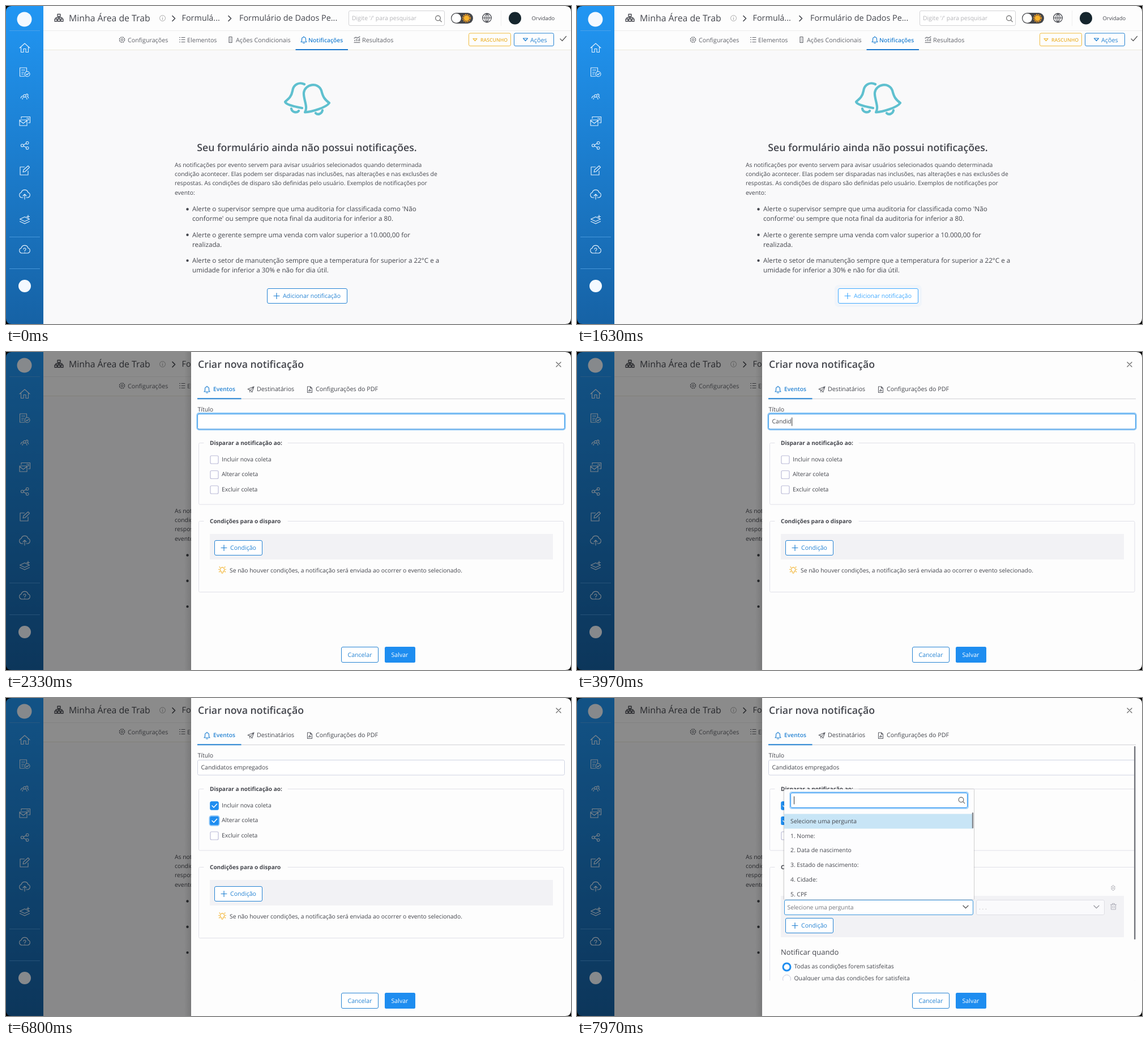
An HTML page for the animation above (8 s loop, 998 px wide and 561 px high).

```html
<!DOCTYPE html>
<html lang="pt-BR">
<head>
<meta charset="utf-8">
<title>Criar nova notificação</title>
<style>
html, body { margin: 0; width: 100%; height: 100%; overflow: hidden; background: #000; }
svg { display: block; width: 998px; height: 561px; font-family: "Open Sans", "Noto Sans", sans-serif; text-rendering: geometricPrecision; }
text { white-space: pre; }
</style>
</head>
<body>
<svg id="stage" viewBox="0 0 998 561"></svg>
<script>
const BLUE = '#1e8df0', LINK = '#2583d3', INK = '#44464d', EDGE = '#e0e0e8';
const LOOP = 8000;

// y is the middle of the capitals
const T = (x, y, size, str, attrs = '') =>
  `<text x="${x}" y="${(y + size * .36).toFixed(2)}" font-size="${size}" ${attrs}>${str}</text>`;
const R = (x, y, w, h, attrs = '') => `<rect x="${x}" y="${y}" width="${w}" height="${h}" ${attrs}/>`;
const C = (x, y, r, attrs = '') => `<circle cx="${x}" cy="${y}" r="${r}" ${attrs}/>`;
const P = (d, color = 'currentColor', width = 1.1, attrs = '') =>
  `<path d="${d}" fill="none" stroke="${color}" stroke-width="${width}" stroke-linecap="round" stroke-linejoin="round" ${attrs}/>`;
const G = (attrs, ...parts) => `<g ${attrs}>${parts.join('')}</g>`;
const at = (x, y, ...parts) => G(`transform="translate(${x} ${y})"`, ...parts);
const line = (color, width = 1) => `fill="none" stroke="${color}" stroke-width="${width}"`;

const frame = (x, y, w, h, color, fill = 'none', attrs = '') =>
  R(x + .5, y + .5, w - 1, h - 1, `rx="2.5" fill="${fill}" stroke="${color}" ${attrs}`);
const plus = (x, y, color) => P(`M${x - 5} ${y}h10M${x} ${y - 5}v10`, color, 1.2);
const chevron = (x, y, color = '#555', k = 4.5) => P(`M${x - k} ${y - k / 2}l${k} ${k}l${k} ${-k}`, color, 1.3);
const lens = (x, y, color) => C(x - 1, y - 1, 4.3, line(color, 1.2)) + P(`M${x + 2.3} ${y + 2.3}l3 3`, color, 1.2);
const bell = (x, y, color) => at(x, y, P('M-5 3.5h10l-1.5-2v-3a3.5 3.5 0 0 0-7 0v3zM-1.5 5.5h3M0-6v-.5', color, 1.2));

const cloud = 'M-5 5a4.6 4.6 0 0 1-1-9a6.2 6.2 0 0 1 12 0a4.6 4.6 0 0 1-1 9';
const menu = [
  [74, 'M-9 0L0-8L9 0M-6.5-1.5v9h4.500v-6h4v6h4.500v-9'],
  [117, 'M0 7h-8.500v-15h12v6M-5.500-4h6M-5.500 0h4M-5.500 3h3M9 3a4.500 4.500 0 1 1-9 0a4.500 4.500 0 1 1 9 0M2.500 3l1.500 1.500l3-3'],
  [160, 'M-4 4.500a4 4 0 0 1 8 0M2.200-1.500a2.200 2.200 0 1 1-4.400 0a2.200 2.200 0 1 1 4.400 0M2.500-4a2 2 0 1 1 2 3.300q2 .7 2.300 3.200M-3.500-1.200q-2.800.5-3.300 3.700'],
  [203, 'M-9-2h13v10h-13zM-9-1l6.500 5l6.500-5M-6-4.500v-3h15.500v10.500h-3M3.500-5h3.500v3h-3.500'],
  [246, 'M-2 0a2.300 2.300 0 1 1-4.600 0a2.300 2.300 0 1 1 4.600 0M7-4.500a2.300 2.300 0 1 1-4.600 0a2.300 2.300 0 1 1 4.600 0M7 4.500a2.300 2.300 0 1 1-4.600 0a2.300 2.300 0 1 1 4.600 0M-2-1l4.600-2.400M-2 1l4.600 2.400'],
  [290, 'M6 1v7h-14v-14h7.500M-3 3l1-4l8-7l2.500 2.500l-7.500 7.500z'],
  [333, cloud + 'h-2M-5 5h2M0 8v-9M-3 2l3-3l3 3'],
  [377, 'M-8.500-1L0-5L8.500-1L0 3zM-8.500 3L0 7L8.500 3M6-8v5M3.500-5.500h5'],
  [431, cloud + 'zM-2-2a2 2 0 1 1 3 1.700q-1 .6-1 1.800M0 3.700v.2']
];
const sidebar = () => G('color="#e6f2fd"',
  R(0, 0, 66, 561, 'fill="url(#side)"'),
  C(32.500, 23.500, 13, 'fill="#f4f9ff"'),
  ...[43, 407, 463].map(y => R(6, y, 54, 1, 'fill="#5ba9ea" opacity=".7"')),
  ...menu.map(([y, d]) => at(33, y, P(d))),
  C(33, 494, 11, 'fill="#f4f9ff"'));

const header = () => G(`fill="${INK}" color="${INK}"`,
  R(66, 0, 932, 77, 'fill="#fdfdfd"'), R(66, 43, 932, 1, 'fill="#ececec"'), R(66, 77, 932, 1, 'fill="#ebe8dc"'),
  P('M91 14.500h5v4h-5zM86 23h4v4h-4zM91.500 23h4v4h-4zM97 23h4v4h-4zM93.500 18.500v4.500M88 23v-2.500h11v2.500', INK, 1.3),
  T(111, 21, 15.8, 'Minha Área de Trab'),
  C(276.500, 21.500, 5, line('#aaa')), P('M276.500 21v3M276.500 19v.1', '#aaa'),
  P('M294 17.500l4.500 4.500l-4.500 4.500M393 17.500l4.500 4.500l-4.500 4.500', INK, 1.7),
  T(310.500, 21, 14.4, 'Formulá...'), T(412, 21, 14.4, 'Formulário de Dados Pe...'),
  frame(605, 8, 170, 27, '#d4d4d6', '#fff'),
  T(611, 21.500, 10.4, "Digite '/' para pesquisar", 'fill="#b4b4b8"'), lens(764, 22.500, '#666'),
  R(786, 12, 39, 19, 'rx="9.500" fill="#45474b"'), C(795.500, 21.500, 8.3, 'fill="#fff"'),
  C(813.500, 21.500, 6.2, `${line('#f39a1f', 2.4)} stroke-dasharray="2 1.25"`), C(813.500, 21.500, 4.8, 'fill="#fbb42c"'),
  C(849.500, 21, 7.8, line(INK, 1.2)), P('M842 21h15.500M849.500 13.500v15.500M849.500 13.200c-5 5-5 11 0 15.600c5-5 5-11 0-15.600', INK),
  R(874, 8, 1, 27, 'fill="#eee"'), C(899, 21.500, 11, 'fill="#15252d"'),
  T(928.500, 22, 9.4, 'Orvidado'),
  G('fill="#606269" color="#606269"',
    at(205, 59.500, C(0, 0, 4.6, line('#606269', 1.3) + ' stroke-dasharray="2.600 1"'), C(0, 0, 1.8, line('#606269'))),
    T(215, 60, 10.7, 'Configurações'),
    P('M310 55.500h6M310 59.500h6M310 63.500h6M306.500 55.500h1M306.500 59.500h1M306.500 63.500h1'),
    T(320, 60, 10.7, 'Elementos'),
    P('M394 54.500h5v10h-5zM396.500 57v.2M396.500 59.500v.2M396.500 62v.2'), T(406, 60, 10.8, 'Ações Condicionais'),
    P('M615 64.500h10M616 62v-2M619 62v-4M622 62v-3M624.500 62v-5M615 57l3-2l3 1.500l4-2.500'), T(629, 60, 10.8, 'Resultados')),
  bell(526, 60, LINK), T(534, 60, 10.3, 'Notificações', `fill="${LINK}" font-weight="600"`),
  R(511.500, 76, 92.500, 2, 'fill="#1b77cc"'),
  frame(817, 47.500, 75, 23.500, '#f0bc3e'), P('M825 57.500h7l-3.500 4z', '#f0bc3e', 1.2),
  T(838, 60, 8.7, 'RASCUNHO', 'fill="#edb432" font-weight="600"'),
  frame(897, 47.500, 71, 23.500, LINK), P('M913.500 57h8l-4 4.500z', LINK, 1.2),
  T(926, 60, 10.8, 'Ações', `fill="${LINK}"`), P('M979 58l3.500 3.500l7-8', '#555', 1.2));

const paragraph = [
  'As notificações por evento servem para avisar usuários selecionados quando determinada',
  'condição acontecer. Elas podem ser disparadas nas inclusões, nas alterações e nas exclusões de',
  'respostas. As condições de disparo são definidas pelo usuário. Exemplos de notificações por',
  'evento:'];
const bullets = [
  ["Alerte o supervisor sempre que uma auditoria for classificada como 'Não",
   "conforme' ou sempre que nota final da auditoria for inferior a 80."],
  ['Alerte o gerente sempre uma venda com valor superior a 10.000,00 for', 'realizada.'],
  ['Alerte o setor de manutenção sempre que a temperatura for superior a 22°C e a',
   'umidade for inferior a 30% e não for dia útil.']];
const page = () => G(`fill="${INK}"`,
  R(66, 78, 932, 483, 'fill="#f9f9fa"'),
  P('M528 187.500C534 178 525 164 526 153C528 138 551 133 557 149C560 161 563 165 571 171C566 179 540 187 528 187.500ZM527 138C519 134 508 137 506 150C504 160 500 163 493 169C494 174 512 178 523 180M504 181C505 188 514 189 517 185M547 189C551 193 558 190 559 184', '#5fc0cf', 4.2),
  T(531.500, 250, 17.7, 'Seu formulário ainda não possui notificações.', 'font-weight="600" text-anchor="middle"'),
  ...paragraph.map((s, i) => T(298, 280 + i * 16.3, 10.38, s)),
  ...bullets.flatMap((pair, i) => [C(320.500, 358.500 + i * 45.3, 2.2),
    ...pair.map((s, j) => T(329, 358 + i * 45.3 + j * 17.2, 11.68, s))]),
  R(461, 498, 142, 27, `id="wave" rx="4" ${line(BLUE, 0)}`),
  G('id="add"', frame(461, 498, 142, 27, 'currentColor', '#fff'), plus(478, 511.500),
    T(489, 511.500, 10.46, 'Adicionar notificação', 'fill="currentColor"')),
  R(994.500, 45, 2.500, 496, 'id="pageBar" rx="1.2" fill="#b3b3b3"'));

const fieldset = (y, bottom, legendEnd, label) =>
  P(`M349 ${y}H342.500Q340.500 ${y} 340.500 ${y + 2}V${bottom - 2}Q340.500 ${bottom} 342.500 ${bottom}H983Q985 ${bottom} 985 ${bottom - 2}V${y + 2}Q985 ${y} 983 ${y}H${legendEnd}`, EDGE, 1) +
  T(360, y - .3, 10.05, label, 'font-weight="700"');
const checkbox = (n, y, label) =>
  R(360, y - 8, 16, 16, `id="ring${n}" rx="3" ${line('#8ec6f8', 3)} opacity="0"`) +
  R(361, y - 7, 14, 14, `id="box${n}" rx="2" fill="#fff" stroke="#bcbcd8" stroke-width="1.2"`) +
  G(`id="tick${n}" opacity="0"`, R(360.500, y - 7.500, 15, 15, `rx="2.500" fill="${BLUE}"`),
    P(`M364 ${y}l3 3l5.500-6`, '#fff', 1.5)) +
  T(381, y - 1, 10.35, label);
const condition = y => frame(368, y, 85, 27, LINK, '#fff') + plus(385, y + 13.500, LINK) +
  T(396, y + 13.500, 10.55, 'Condição', `fill="${LINK}"`);
const basic = () => G('id="basic"', fieldset(298.500, 423.500, 498, 'Condições para o disparo'),
  R(360, 321, 606, 45, 'fill="#f2f2f5"'),
  R(368, 332, 85, 27, `id="wave2" rx="4" ${line(BLUE, 0)}`), condition(332),
  at(382, 385, P('M-2 3.500q0-1.500-1-2.500a3.700 3.700 0 1 1 6 0q-1 1-1 2.500zM-1 5.500h2M-6.500-1.500h1M5.500-1.500h1M-5-6l1 1M5-6l-1 1M-5.500 3l1-1M5.500 3l-1-1', '#f3b73b', 1.2)),
  T(395, 385.500, 10.35, 'Se não houver condições, a notificação será enviada ao ocorrer o evento selecionado.'));
const more = () => G('id="more" opacity="0"', fieldset(298.500, 590, 498, 'Condições para o disparo'),
  P('M943.500 333.500l3.500-3.500l3.500 3.500zM943.500 336.500l3.500 3.500l3.500-3.500z', '#b5b5bb', 1),
  R(360, 349, 606, 73, 'fill="#f2f2f5"'),
  frame(366, 356, 334, 27, '#d4d4dc', '#fff', 'id="pick"'), T(371.500, 368.800, 10.35, 'Selecione uma pergunta', 'fill="#73757c"'),
  chevron(686.500, 368.500), frame(705, 356, 227, 27, '#dedee4', '#fafafc'), T(710, 369, 10.4, '. . .', 'fill="#b5b5bb"'),
  chevron(917.500, 368.500, '#9a9aa2'),
  P('M942.500 364.500h10M945.500 364v-1.500h4v1.500M943.500 364.500v8.500h8v-8.500M946 367v3.500M949 367v3.500', '#b0b0ba', 1),
  condition(388), T(360, 448, 13, 'Notificar quando'),
  C(370.500, 474.500, 6.5, `fill="#fff" stroke="${BLUE}" stroke-width="3"`), T(383.500, 473.500, 10.4, 'Todas as condições forem satisfeitas'),
  C(370.500, 495.500, 7, 'fill="#fff" stroke="#c6c6d8"'), T(383.500, 494.500, 10.4, 'Qualquer uma das condições for satisfeita'),
  R(984, 84, 14, 415, 'fill="#fdfdfd"'), R(984, 85, 2.500, 341, 'rx="1" fill="#777980"'));

const options = ['Selecione uma pergunta', '1. Nome:', '2. Data de nascimento', '3. Estado de nascimento:', '4. Cidade:', '5. CPF'];
const dropdown = () => G('id="drop" opacity="0"',
  R(363.500, 159.500, 339, 197, 'fill="#000" opacity=".05" rx="3"'), R(365, 160.500, 337, 195, 'fill="#000" opacity=".12" rx="2"'),
  R(366, 161, 335, 194, 'fill="#fdfdfe"'),
  R(376, 166, 315, 29, `rx="3.500" ${line('#a9d5fa', 2)}`), frame(377, 167, 313, 27, BLUE, '#fff'),
  R(383, 173.500, 1, 14, 'fill="#333"'), lens(679.500, 180.500, '#666'),
  R(366, 204.500, 333, 26, 'fill="#c8e5f6"'),
  ...options.map((s, i) => T(377, 217.300 + i * 25.7, 10.35, s)),
  R(697.800, 202, 2.400, 28, 'rx="1" fill="#85878d"'));

const drawer = () => G(`id="drawer" fill="${INK}"`,
  R(315, 0, 12, 561, 'fill="url(#edge)"'), R(327, 0, 671, 561, 'fill="#fdfdfd"'),
  T(339, 22, 17.75, 'Criar nova notificação', 'font-weight="600"'), P('M972 18l8 8M980 18l-8 8', '#666', 1.2),
  R(338, 81.800, 649, 1.500, 'fill="#dcdcdf"'), R(338, 81.300, 77.500, 2, `fill="${LINK}"`),
  bell(355, 66.500, LINK), T(366, 65.500, 10.3, 'Eventos', `fill="${LINK}" font-weight="600"`),
  P('M427 65.500l11-4.500l-3.500 10l-2.500-3.500zM432 67.500l6-6.500M430 66.500l1 4.500', '#606269'), T(443, 65.500, 10.7, 'Destinatários'),
  P('M532.500 61h5l3 3v7.500h-8zM537.500 61v3h3M534.500 69l2-3l2 2.500z', '#606269'), T(547, 65.500, 10.75, 'Configurações do PDF'),
  G('clip-path="url(#body)"',
    T(338.500, 101.500, 10.5, 'Título'),
    R(337.500, 108, 650, 29, `id="glow" rx="3.500" ${line('#8fc8f7', 2.5)}`),
    frame(338, 109, 649, 27.500, '#cfd3e2', '#fff'),
    frame(338, 109, 649, 27.500, '#3a9bea', 'none', 'id="focus"'),
    T(344.500, 122.500, 10.44, '', 'id="typed"'), R(345, 115.500, 1, 15, 'id="caret" fill="#333"'),
    fieldset(160.500, 269, 498, 'Disparar a notificação ao:'),
    checkbox(1, 190, 'Incluir nova coleta'), checkbox(2, 216.500, 'Alterar coleta'), checkbox(3, 243, 'Excluir coleta'),
    basic(), more()),
  dropdown(),
  frame(592, 520, 66, 28, LINK, '#fff'), T(603.500, 534, 10.6, 'Cancelar', `fill="${LINK}"`),
  G('id="save"', R(669, 520, 54, 28, `rx="2.500" fill="${BLUE}"`), T(680.500, 534, 10.6, 'Salvar', 'fill="#fff"')));

const stage = document.getElementById('stage');
stage.innerHTML = `<defs>
  <linearGradient id="side" x2="0" y2="1"><stop stop-color="#2196f3"/><stop offset="1" stop-color="#1662a5"/></linearGradient>
  <linearGradient id="edge"><stop stop-opacity="0"/><stop offset="1" stop-opacity=".12"/></linearGradient>
  <clipPath id="body">${R(327, 84, 671, 414.500)}</clipPath></defs>` +
  page() + header() + sidebar() + R(0, 0, 998, 561, 'id="mask"') + drawer() +
  '<path fill-rule="evenodd" d="M0 0H998V561H0ZM10 0Q0 0 0 10V551Q0 561 10 561H988Q998 561 998 551V10Q998 0 988 0Z"/>';

const el = {};
stage.querySelectorAll('[id]').forEach(n => el[n.id] = n);
const set = (id, name, value) => el[id].setAttribute(name, value);
const fade = (id, value) => set(id, 'opacity', value);
const ramp = (t, a, b) => Math.min(1, Math.max(0, (t - a) / (b - a)));
const between = (t, a, b) => t >= a && t < b;

// cubic-bezier(.23, 1, .32, 1)
function easeOut(x) {
  let lo = 0, hi = 1;
  for (let i = 0; i < 24; i++) {
    const s = (lo + hi) / 2, r = 1 - s;
    if (.69 * r * r * s + .96 * r * s * s + s ** 3 < x) lo = s; else hi = s;
  }
  return 1 - (1 - lo) ** 3;
}

const slideSteps = [1700, 1730, 1770, 1800, 1830, 1870];
const title = 'Candidatos empregados';
const keyTimes = [2770, 2930, 3030, 3130, 3270, 3970, 4030, 4100, 4170, 4270,
  ...Array.from({ length: 11 }, (_, i) => 4470 + i * 63)];

function ripple(id, t, start, x, y, w, h) {
  const k = ramp(t, start, start + 400), grow = 6 * easeOut(k);
  set(id, 'x', x - grow / 2); set(id, 'y', y - grow / 2);
  set(id, 'width', w + grow); set(id, 'height', h + grow);
  set(id, 'stroke-width', grow);
  fade(id, t < start ? 0 : .35 * (1 - k));
}

function render(t) {
  fade('pageBar', ramp(t, 30, 490) * (1 - ramp(t, 870, 1330)));
  const hover = ramp(t, 870, 1100);
  el.add.style.color = `rgb(${37 + 27 * hover},${131 + 38 * hover},${211 + 44 * hover})`;
  ripple('wave', t, 1270, 461, 498, 142, 27);

  const step = slideSteps.filter(s => s <= t).pop();
  const open = step ? easeOut(ramp(step, 1604, 1904)) : 0;
  const shift = step === slideSteps.at(-1) ? 0 : 671 * (1 - open);
  set('drawer', 'transform', `translate(${shift} 0)`);
  fade('drawer', step ? ramp(step, 1100, 1770) : 0);
  fade('save', step < 1770 ? .8 : 1);
  fade('mask', .45 * open ** 4);

  const focus = ramp(t, 1770, 1870) * (1 - ramp(t, 5900, 6170));
  fade('glow', focus); fade('focus', focus);
  const count = keyTimes.filter(k => k <= t).length;
  if (el.typed.textContent.length !== count) el.typed.textContent = title.slice(0, count);
  set('caret', 'x', 345 + (count ? el.typed.getComputedTextLength() : 0));
  const off = between(t, 2330, 2770) || between(t, 3530, 3970) || t >= 5330;
  fade('caret', off ? 0 : 1);

  fade('tick1', ramp(t, 5960, 6100)); fade('tick2', ramp(t, 6600, 6740));
  fade('ring1', ramp(t, 5960, 6160) * (1 - ramp(t, 6600, 6760)));
  fade('ring2', ramp(t, 6600, 6780) * (1 - ramp(t, 6970, 7170)));
  set('box1', 'stroke', t >= 5900 ? BLUE : '#bcbcd8');
  set('box2', 'stroke', t >= 6330 ? BLUE : '#bcbcd8');

  ripple('wave2', t, 6970, 368, 332, 85, 27);
  fade('basic', t < 7070 ? 1 : 0);
  fade('more', t < 7070 ? 0 : .4 + .6 * ramp(t, 7070, 7370));
  set('pick', 'stroke', t >= 7570 ? '#3d97dc' : '#d4d4dc');
  const drop = t < 7600 ? 0 : easeOut(ramp(t, 7590, 7830));
  const scale = .8 + .2 * drop;
  fade('drop', drop);
  set('drop', 'transform', `translate(0 ${355 * (1 - scale)}) scale(1 ${scale})`);
}

const begin = performance.now();
function tick() {
  render((performance.now() - begin) % LOOP);
  requestAnimationFrame(tick);
}
tick();
</script>
</body>
</html>
```
